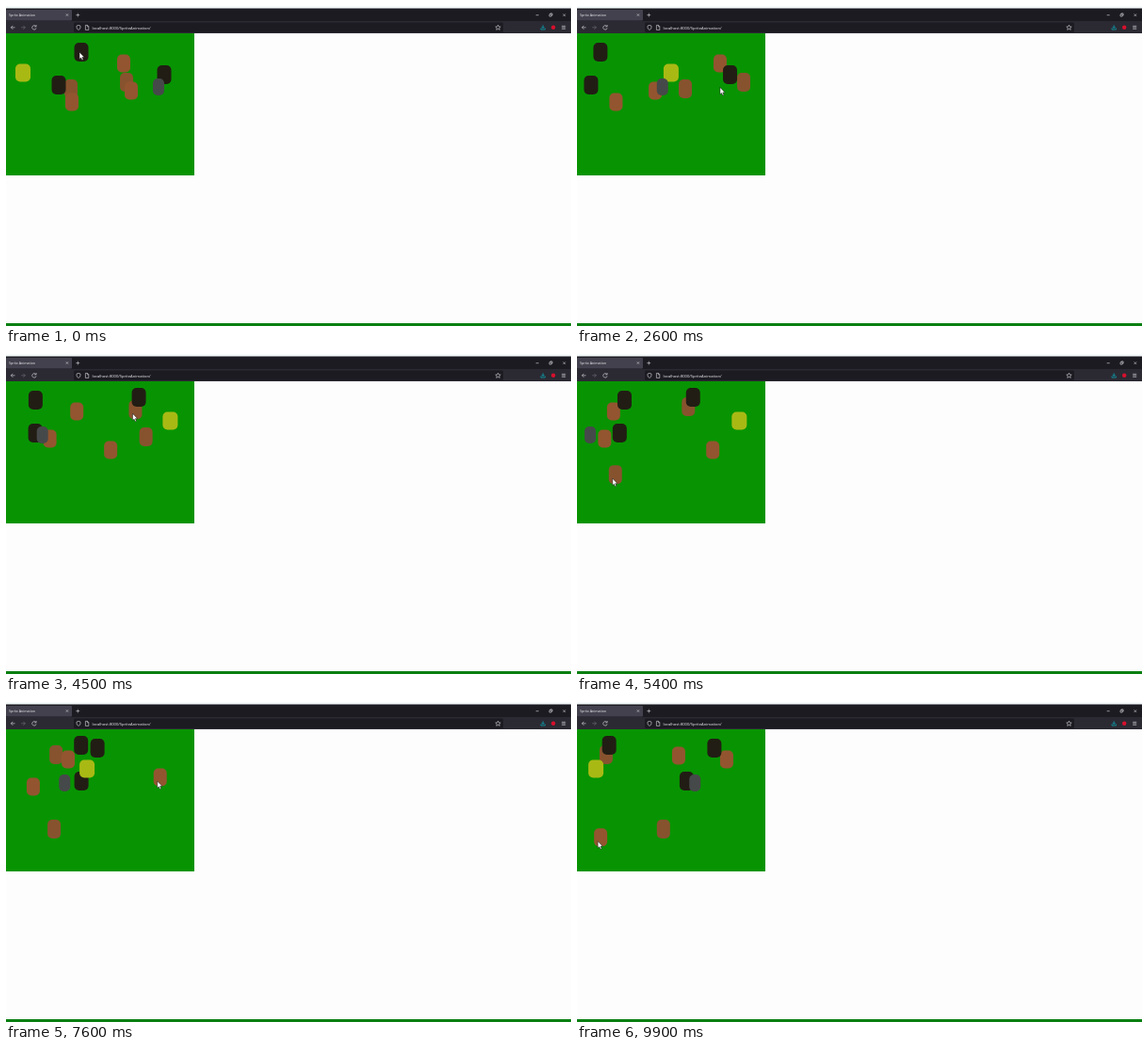
Write an HTML page that moves like this. It is 600 px wide and 340 px high and loops after 10 s.

```html
<!DOCTYPE html>
<html lang="en">
<head>
<meta charset="utf-8">
<title>Sprite Animation</title>
<style>
html, body { margin: 0; width: 100%; height: 100%; overflow: hidden; background: #fdfdfd; }
svg { display: block; width: 600px; height: 340px; }
text { font-family: "Open Sans", "Noto Sans", sans-serif; fill: #f4f4f6; }
.icon { fill: none; stroke: #dcdce0; stroke-width: .6; }
</style>
</head>
<body>
<svg viewBox="0 0 600 340">
  <rect width="600" height="340" fill="#fdfdfd"/>
  <rect width="600" height="3" fill="#f3f8f8"/>
  <rect y="2.5" width="600" height="14" fill="#1c1b22"/>
  <rect y="4" width="70" height="11.5" rx="1" fill="#42414d"/>
  <rect y="16" width="600" height="13" fill="#2b2a33"/>
  <rect x="72" y="17.5" width="456" height="10.5" rx="1.2" fill="#1c1b22"/>
  <text x="3" y="11" font-size="3.6">Sprite Animation</text>
  <text x="91.5" y="24.6" font-size="4.13">localhost:8000/SpriteAnimation/</text>

  <g class="icon">
    <path d="M63.8 8.4l2.2 2.2m0-2.2l-2.2 2.2M74.4 9.6h3.8m-1.9-1.9v3.8"/>
    <path d="M562.7 9.7h3M577 8.8h2.2v2.2H577zM577.9 8.6v-.7h2.2v2.2h-.7M591.6 8.4l2.5 2.5m0-2.5l-2.5 2.5"/>
    <path d="M9.5 22.8H5.3m2-2l-2 2 2 2"/>
    <path d="M16.2 22.8h4.2m-2-2l2 2-2 2" stroke="#74737c"/>
    <path d="M31.6 21.4a2.2 2.2 0 1 0 .5 2M32.1 20v1.9h-1.9"/>
    <path d="M77 20.4l2 .7v1.7q0 1.7-2 2.6-2-.9-2-2.6v-1.7z"/>
    <path d="M84.4 20.4h2.1l1.3 1.3v3.7h-3.4zM86.4 20.5v1.4h1.4"/>
    <path d="M522.5 20.2l.8 1.7 1.9.2-1.4 1.3.4 1.9-1.7-1-1.7 1 .4-1.9-1.4-1.3 1.9-.2z"/>
    <path d="M570.2 20.3v3.2m-1.5-1.5l1.5 1.5 1.5-1.5M568 23.5v1.5h4.4v-1.5" stroke="#00c8d7"/>
    <path d="M590.2 21.3h4m-4 1.5h4m-4 1.5h4"/>
  </g>
  <circle cx="581.2" cy="22.8" r="2.2" fill="#d8102c"/>

  <rect y="29" width="200" height="151" fill="#089402"/>
  <rect y="337" width="600" height="3" fill="#087f10"/>
  <g id="cast"></g>
  <path id="cursor" d="M0 0v7.4l1.6-1.4 1.2 2.6 1.3-.6-1.2-2.5h2.3z" fill="#fff" stroke="#111" stroke-width=".5"/>
</svg>
<script>
const LEFT = 8, SPAN = 183, LOOP = 10;

const KINDS = {
  girl: { w: 15, h: 20, color: '#211d14' },
  explorer: { w: 14, h: 19, color: '#93552f' },
  caveman: { w: 14, h: 20, color: '#87532e' },
  bigHat: { w: 16, h: 19, color: '#a9b914' },
  grey: { w: 12, h: 18, color: '#46494a' }
};

// A walker covers from + speed * t along a path that bounces between the walls;
// a negative start walks left first. A drag lifts it to a new distance and height.
const CAST = [
  { kind: 'caveman', y: 81, from: 128, speed: 29.6, drag: { t0: 4.3, t1: 4.7, to: 243, y: 56 } },
  { kind: 'explorer', y: 90, from: -117, speed: 19.2, drag: { t0: 9.3, t1: 10, to: 25, y: 144 } },
  { kind: 'caveman', y: 88, from: 69, speed: 17.7, drag: { t0: 4.95, t1: 5.9, to: 21, y: 135 } },
  { kind: 'girl', y: 84, from: -40, speed: 15.8 },
  { kind: 'bigHat', y: 71, from: -2, speed: 39.2 },
  { kind: 'explorer', y: 61, from: 125, speed: 40.4 },
  { kind: 'girl', y: 73, from: 168, speed: 19.8, drag: { t0: 3.48, t1: 4.1, to: 233, y: 46 } },
  { kind: 'girl', y: 49, from: -64, speed: 21.2 },
  { kind: 'grey', y: 86, from: -146, speed: 27.4 },
  { kind: 'explorer', y: 102, from: -54, speed: 36.7, drag: { t0: 7.4, t1: 8.4, to: 219, y: 57 } }
];

const mix = (a, b, p) => a + (b - a) * p;
const easeOut = p => 1 - (1 - p) ** 3;

function bounce(u) {
  const lap = 2 * SPAN, d = (((u - LEFT) % lap) + lap) % lap;
  return LEFT + Math.min(d, lap - d);
}

function position({ y, from, speed, drag }, t) {
  if (!drag || t < drag.t0) return { x: bounce(from + speed * t), y };
  if (t > drag.t1) return { x: bounce(drag.to + speed * (t - drag.t1)), y: drag.y };
  const p = easeOut((t - drag.t0) / (drag.t1 - drag.t0));
  return {
    x: mix(bounce(from + speed * drag.t0), bounce(drag.to), p),
    y: mix(y, drag.y, p)
  };
}

// The pointer holds a walker during its drag and glides between stops otherwise.
function grip(walker, t) {
  const { x, y } = position(walker, t);
  return { t, x: x - 3, y: y + 4 };
}

const dragged = CAST.filter(w => w.drag);
const stops = [
  { t: 0, x: 78, y: 49 },
  { t: 1.7, x: 162, y: 96 },
  { t: 6.6, x: 140, y: 107 },
  { t: 8.6, x: 162, y: 67 },
  ...dragged.flatMap(w => [grip(w, w.drag.t0), grip(w, w.drag.t1)])
].sort((a, b) => a.t - b.t);

function pointer(t) {
  const held = dragged.find(w => t >= w.drag.t0 && t <= w.drag.t1);
  if (held) return grip(held, t);
  const i = stops.findIndex(s => s.t > t), a = stops[i - 1], b = stops[i];
  const p = (t - a.t) / (b.t - a.t);
  return { x: mix(a.x, b.x, p), y: mix(a.y, b.y, p) };
}

const place = (el, { x, y }) => el.setAttribute('transform', `translate(${x.toFixed(2)} ${y.toFixed(2)})`);
const group = document.getElementById('cast');
const cursor = document.getElementById('cursor');

for (const walker of CAST) {
  const { w, h, color } = KINDS[walker.kind];
  walker.el = document.createElementNS('http://www.w3.org/2000/svg', 'rect');
  const attrs = { x: -w / 2, y: -h / 2, width: w, height: h, rx: 5, fill: color };
  for (const name in attrs) walker.el.setAttribute(name, attrs[name]);
  group.append(walker.el);
}

const start = performance.now();
function draw() {
  const t = Math.floor((performance.now() - start) / 100) / 10 % LOOP;
  for (const walker of CAST) place(walker.el, position(walker, t));
  place(cursor, pointer(t));
  requestAnimationFrame(draw);
}
draw();
</script>
</body>
</html>
```
